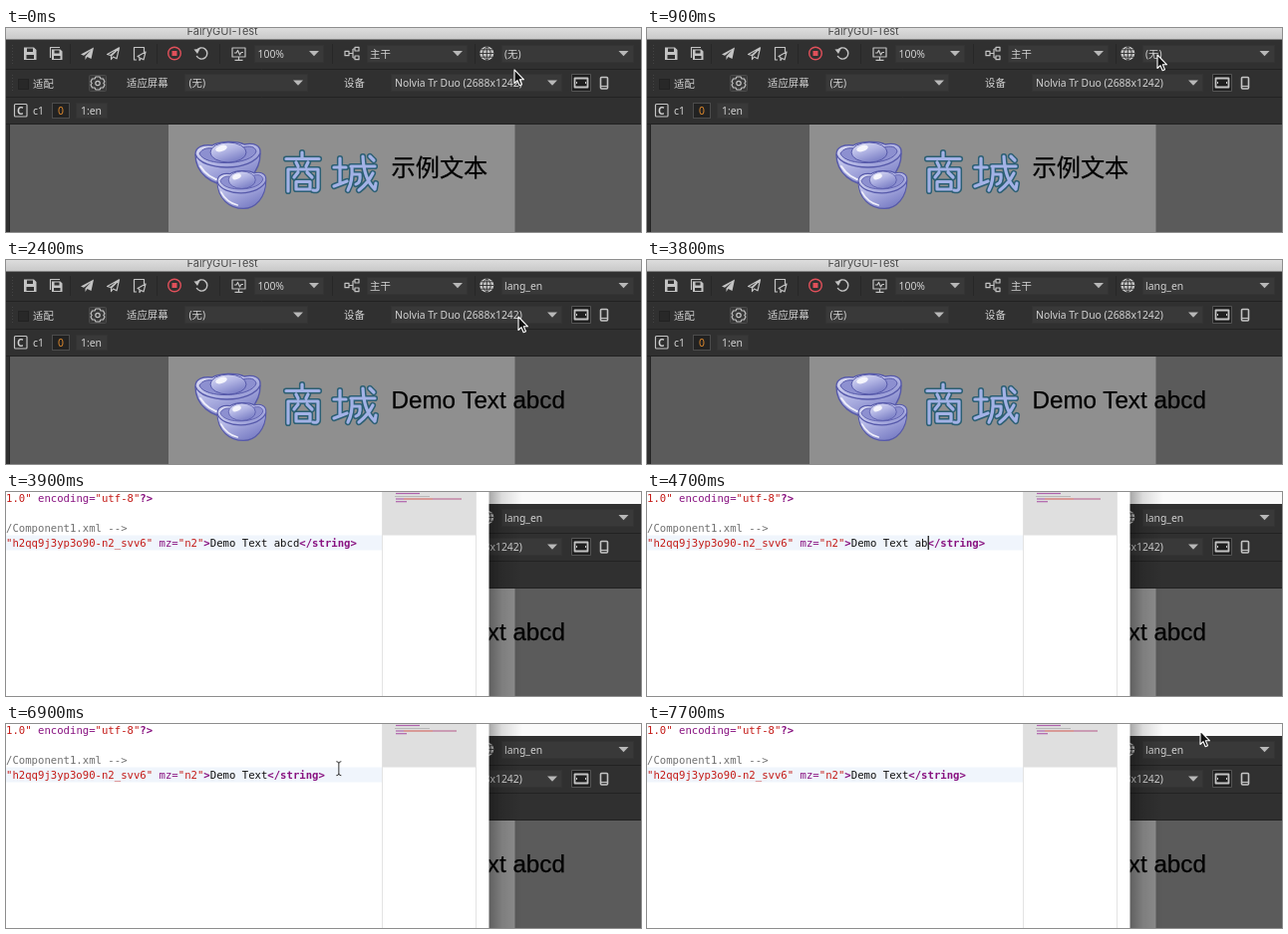
Animation of 637x205 px, one loop 8 s. Source, as an HTML page:

```html
<!DOCTYPE html>
<html lang="zh-CN">
<head>
<meta charset="utf-8">
<title>Language switch</title>
<style>
html, body { margin: 0; width: 100%; height: 100%; overflow: hidden; background: #303030; }
svg { display: block; width: 637px; height: 205px; }
text { white-space: pre; }
.ui { font: 10.4px "Noto Sans", "Noto Sans CJK SC", "Noto Sans CJK", sans-serif; fill: #d2d2d2; }
.code { font: 10.63px "DejaVu Sans Mono", monospace; fill: #111; }
.box { fill: #393939; stroke: #343434; }
.ico { fill: none; stroke: #c4c4c4; stroke-width: 1.4; stroke-linejoin: round; }
.solid { fill: #c4c4c4; }
.art { fill: none; stroke-linecap: round; stroke-linejoin: round; }
.str { fill: #c41a16; }
.tag { fill: #881280; font-weight: bold; }
.attr { fill: #881280; }
.note { fill: #707070; }
</style>
</head>
<body>
<svg viewBox="0 0 637 205">
  <defs>
    <linearGradient id="bar" x2="0" y2="1">
      <stop offset="0" stop-color="#dddddd"/><stop offset="1" stop-color="#c8c8c8"/>
    </linearGradient>
    <linearGradient id="silver" x1="0" y1="0" x2=".6" y2="1">
      <stop offset="0" stop-color="#e2e3f6"/><stop offset=".5" stop-color="#b2b5e4"/><stop offset="1" stop-color="#7c80c6"/>
    </linearGradient>
    <linearGradient id="shade">
      <stop offset="0" stop-opacity=".34"/><stop offset=".4" stop-opacity=".12"/><stop offset="1" stop-opacity="0"/>
    </linearGradient>
    <path id="drop" d="M-5-2.5H5L0 2.8Z" fill="#b8b8b8"/>
    <g id="ingot" stroke="#5659aa" stroke-width="1.4" stroke-linejoin="round">
      <path d="M190 127C190 119 198 117 207 118C213 114 232 113 239 117C249 115 256 118 255 126C255 145 241 158 225 158C206 158 190 146 190 127Z" fill="url(#silver)"/>
      <path d="M194 126C197 121 203 120 208 121C217 116 230 116 238 120C244 118 250 119 251 124C247 138 199 140 194 126Z" fill="#8d90d0" stroke-width="1"/>
      <ellipse cx="223" cy="125" rx="18" ry="10" fill="url(#silver)" stroke-width="1"/>
      <path d="M190 127C197 145 247 144 255 126" fill="none"/>
      <path d="M195 139C200 147 208 152 217 154" fill="none" stroke="#eeeefa" stroke-width="2" stroke-linecap="round"/>
      <ellipse cx="216" cy="121" rx="6" ry="3" fill="#f5f5fc" stroke="none" transform="rotate(-18 216 121)"/>
    </g>
    <path id="shop" d="M297 125V130M281 131.500H314M291 135L293 139M303 135L301 139M283 164V142H313V161Q313 164 308 163M293 145L289 150M302 145L307 150M291 154.500H305V162H291Z
      M329 140H341M335 131V156M329 159L342 154M346 139H370M347 139Q348 154 343 163M348 147H355Q356 156 351 157M358 129Q359 152 370 162L371 156M368 146Q363 156 354 163M365 129L369 133"/>
  </defs>

  <!-- window -->
  <rect width="637" height="205" fill="#303030"/>
  <rect width="637" height="11.5" fill="url(#bar)"/>
  <text x="181.500" y="6.500" font-family="Inter, sans-serif" font-size="11" fill="#4c4c4c">FairyGUI-Test</text>
  <path d="M0 41.500H637M0 69.500H637M0 96.500H637" stroke="#222"/>
  <path d="M64.500 16V36M151.500 16V36M214.500 16V36M327.500 16V36M470.500 16V36" stroke="#272727"/>
  <path d="M6.500 17V36M6.500 47V65" stroke="#444" stroke-dasharray="1 2"/>

  <!-- first toolbar -->
  <g class="ico">
    <path class="solid" stroke="none" fill-rule="evenodd" d="M18 19.500H28L30.500 22V32H18ZM21 20.500V24H27V20.500ZM20.500 27V31H28V27Z"/>
    <path d="M44.500 30V19.500H54" stroke-width="1.200"/>
    <path class="solid" stroke="none" fill-rule="evenodd" d="M46 21.500H54.500L56.500 23.500V32H46ZM48.500 22.500V25.500H53.500V22.500ZM48 28V31H54.500V28Z"/>
    <path class="solid" stroke="none" d="M75 26.500L88 19.500L85.500 31L81.500 29L79.500 32V28.500L85 22.500L78 27.800Z"/>
    <path d="M101.500 26.500L113.500 19.800L111 30.800L107.500 29L105.500 31.500V28L113 20.500L105 27.500Z" stroke-width="1.200"/>
    <path d="M138.500 24V19.500H128.500V32H131M132 28.500L140 24L138 31.800L135.500 30.500L134 32.500V29.500Z" stroke-width="1.200"/>
    <circle cx="169" cy="25.500" r="6.300" stroke="#e0505a"/>
    <rect x="166.500" y="23" width="5" height="5" fill="#e0505a" stroke="none"/>
    <path d="M191.200 23A5.600 5.600 0 1 1 191.200 28"/>
    <path class="solid" stroke="none" d="M188.500 21.500L194.500 21L192 26Z"/>
    <path d="M227 20H240V29H227ZM233.500 29V32M229.500 32.300H237.500M229 25H231L232.500 22.500L234.500 27L236 24.500H238" stroke-width="1.200"/>
    <path d="M344 25.500H348M348 21V30M348 21H350M348 30H350M340 23.300H344V27.700H340ZM350 19.300H354V23H350ZM350 28H354V31.700H350Z" stroke-width="1.200"/>
    <circle class="solid" cx="482.300" cy="25.500" r="7" stroke="none"/>
    <path d="M475 25.500H489.500M482.300 18.500V32.500M482.300 18.500C477 23 477 28 482.300 32.500C487.500 28 487.500 23 482.300 18.500M476.500 21.800H488M476.500 29.200H488" stroke="#303030" stroke-width=".9"/>
  </g>
  <g class="box">
    <rect x="249.500" y="17.500" width="69" height="17"/>
    <rect x="362.500" y="17.500" width="100" height="17"/>
    <rect x="497.500" y="17.500" width="132" height="17"/>
    <rect x="179.500" y="46.500" width="123" height="17"/>
    <rect x="386.500" y="46.500" width="171" height="17"/>
    <rect x="12.500" y="51.500" width="10" height="10" fill="#282828" stroke="#222"/>
    <rect x="46.500" y="75.500" width="17" height="15" fill="#222" stroke="#4c4c4c"/>
    <rect x="70.500" y="75.500" width="31" height="15"/>
  </g>
  <use href="#drop" x="309" y="25.500"/><use href="#drop" x="453" y="25.500"/><use href="#drop" x="619.500" y="25.500"/>
  <use href="#drop" x="293" y="55"/><use href="#drop" x="548" y="55"/>
  <g class="ui">
    <text x="252.500" y="29.500">100%</text>
    <text x="365" y="29.500">主干</text>
    <text x="500" y="29.500" id="lang"></text>
    <text x="27" y="59.500">适配</text>
    <text x="121" y="59">适应屏幕</text>
    <text x="183.500" y="59">(无)</text>
    <text x="339" y="59">设备</text>
    <text x="390" y="59">Nolvia Tr Duo (2688x1242)</text>
    <text x="27" y="86.500">c1</text>
    <text x="52" y="87" fill="#e08a2c">0</text>
    <text x="75" y="87">1:en</text>
    <text x="11" y="86.500" font-weight="bold">C</text>
  </g>
  <!-- second and third toolbar icons -->
  <g class="ico">
    <rect x="83.500" y="47.500" width="17" height="16" rx="1" fill="#393939" stroke="#4a4a4a" stroke-width="1"/>
    <path d="M90 49H94L95 51L97.500 51L99 54L97.800 55.500L99 57L97.500 60L95 60L94 62H90L89 60L86.500 60L85 57L86.200 55.500L85 54L86.500 51L89 51Z" stroke-width="1.200"/>
    <circle cx="92" cy="55.500" r="2.200" stroke-width="1.200"/>
    <rect x="567.500" y="46.500" width="19" height="17" fill="#1f1f1f" stroke="#555" stroke-width="1"/>
    <rect x="570.500" y="50.500" width="13" height="9" stroke-width="1.800"/>
    <path d="M572.500 54V56M581.500 54V56" stroke-width="1"/>
    <rect x="596.500" y="49.500" width="7" height="11.500" rx="1" stroke-width="1.600"/>
    <path d="M597 58.500H603" stroke-width="1.200"/>
    <rect x="8.500" y="76.500" width="12.500" height="12.500" rx="1" stroke-width="1.200"/>
  </g>

  <!-- canvas -->
  <rect x="4" y="97" width="633" height="108" fill="#5b5b5b"/>
  <rect x="163" y="97" width="347.500" height="108" fill="#8f8f8f"/>
  <path d="M3.500 97V205" stroke="#252525"/>
  <use href="#ingot"/>
  <use href="#ingot" transform="translate(69.500 44) scale(.75 .87)"/>
  <g class="art" role="img" aria-label="商城">
    <use href="#shop" stroke="#2c5f73" stroke-width="6.200"/>
    <use href="#shop" stroke="#a3b2e6" stroke-width="3.200"/>
  </g>
  <text x="386.500" y="149" font-size="24.200" font-family="'Liberation Sans', 'Noto Sans CJK SC', 'Noto Sans CJK', sans-serif" stroke="#000" stroke-width=".25" id="demo"></text>

  <g id="menu">
    <rect x="496" y="36" width="136" height="36" opacity=".25"/>
    <rect x="498.500" y="35.500" width="131" height="33" fill="#2e2e2e" stroke="#1d1d1d"/>
    <g class="ui"><text x="500" y="48">(无)</text><text x="500" y="64">lang_en</text></g>
  </g>

  <!-- text editor -->
  <g id="editor">
    <rect x="484" y="0" width="153" height="12" fill="#fafafa"/>
    <rect x="484" width="34" height="205" fill="url(#shade)"/>
    <rect width="484.500" height="205" fill="#fff"/>
    <rect y="43.500" width="377" height="15" fill="#f0f5fc"/>
    <rect x="378" width="93" height="43.500" fill="#dfdfdf"/>
    <path d="M377.500 0V205M471.500 0V205" stroke="#e3e3e3"/>
    <g class="code">
      <text y="10"><tspan class="str">1.0"</tspan> <tspan class="attr">encoding=</tspan><tspan class="str">"utf-8"</tspan><tspan class="tag">?&gt;</tspan></text>
      <text y="40" class="note">/Component1.xml --&gt;</text>
      <text y="55"><tspan class="str">"h2qq9j3yp3o90-n2_svv6"</tspan> <tspan class="attr">mz=</tspan><tspan class="str">"n2"</tspan><tspan class="tag">&gt;</tspan><tspan id="typed"></tspan><tspan class="tag">&lt;/string&gt;</tspan></text>
    </g>
    <g fill="none" stroke-width="1.200" opacity=".75">
      <path d="M391 1.500H415" stroke="#a03a9c"/>
      <path d="M390 4.500H425" stroke="#aaa"/>
      <path d="M391 7H399" stroke="#a03a9c"/>
      <path d="M399 7H428" stroke="#d0453f"/>
      <path id="mini" stroke="#b04a80"/>
      <path d="M391 9.700H402" stroke="#a03a9c"/>
    </g>
    <rect id="caret" y="44" width="1.300" height="14" fill="#222"/>
  </g>

  <path id="beam" d="M-2.500-7Q0-7 0-5Q0-7 2.500-7M0-5V5M-2.500 7Q0 7 0 5Q0 7 2.500 7" fill="none" stroke="#333"/>
  <path id="arrow" d="M0 0V13.500L3 10.700L5.200 15.800L7.500 14.800L5.300 9.800H9.500Z" fill="#111" stroke="#fff" stroke-width="1.100" stroke-linejoin="round"/>
</svg>
<script>
const LOOP = 8000, STEP = 100, CHAR = 6.4, TEXT_X = 32 * CHAR;
const PHRASE = 'Demo Text abcd';
const DELETES = [4500, 4700, 4900, 5900, 6200];
// pointer keys: time, x, y
const POINTER = [
  [0, 510, 42], [200, 400, 96], [400, 200, 148], [500, 153, 138], [700, 380, 112],
  [900, 512, 27], [1400, 514, 30], [1800, 514, 57], [3200, 514, 57], [3300, 508, 30],
  [3600, 411, 119], [4200, 396, 13], [4600, 297, 51], [6800, 297, 51], [7500, 555, 7]
];
const el = id => document.getElementById(id);
const show = (id, on) => { el(id).style.display = on ? '' : 'none'; };
const within = (t, a, b) => t >= a && t < b;

function pointerAt(t) {
  const i = POINTER.findIndex(k => k[0] > t);
  if (i < 0) return POINTER[POINTER.length - 1].slice(1);
  const [t0, x0, y0] = POINTER[i - 1], [t1, x1, y1] = POINTER[i];
  const p = (t - t0) / (t1 - t0);
  return [x0 + (x1 - x0) * p, y0 + (y1 - y0) * p];
}

function draw(t) {
  const english = t >= 1900, editing = t >= 3900;
  el('lang').textContent = english ? 'lang_en' : '(无)';
  el('demo').textContent = english ? PHRASE : '示例文本';
  show('menu', within(t, 1000, 1900));
  show('editor', editing);

  const length = PHRASE.length - DELETES.filter(d => t >= d).length;
  el('typed').textContent = PHRASE.slice(0, length);
  el('caret').setAttribute('x', TEXT_X + length * CHAR);
  show('caret', within(t, 4600, 5100) || within(t, 5600, 6500) || within(t, 7100, 7700));
  el('mini').setAttribute('d', `M428 7H${443 + length}`);

  const [x, y] = pointerAt(t);
  const moving = t < 3700 || within(t, 4300, 4700) || t >= 6900;
  const beam = editing && x < 378;
  for (const id of ['beam', 'arrow']) {
    el(id).setAttribute('transform', `translate(${x} ${y})`);
    show(id, moving && beam === (id === 'beam'));
  }
}

function tick() {
  draw(Math.floor(performance.now() % LOOP / STEP) * STEP);
  requestAnimationFrame(tick);
}
tick();
</script>
</body>
</html>
```
